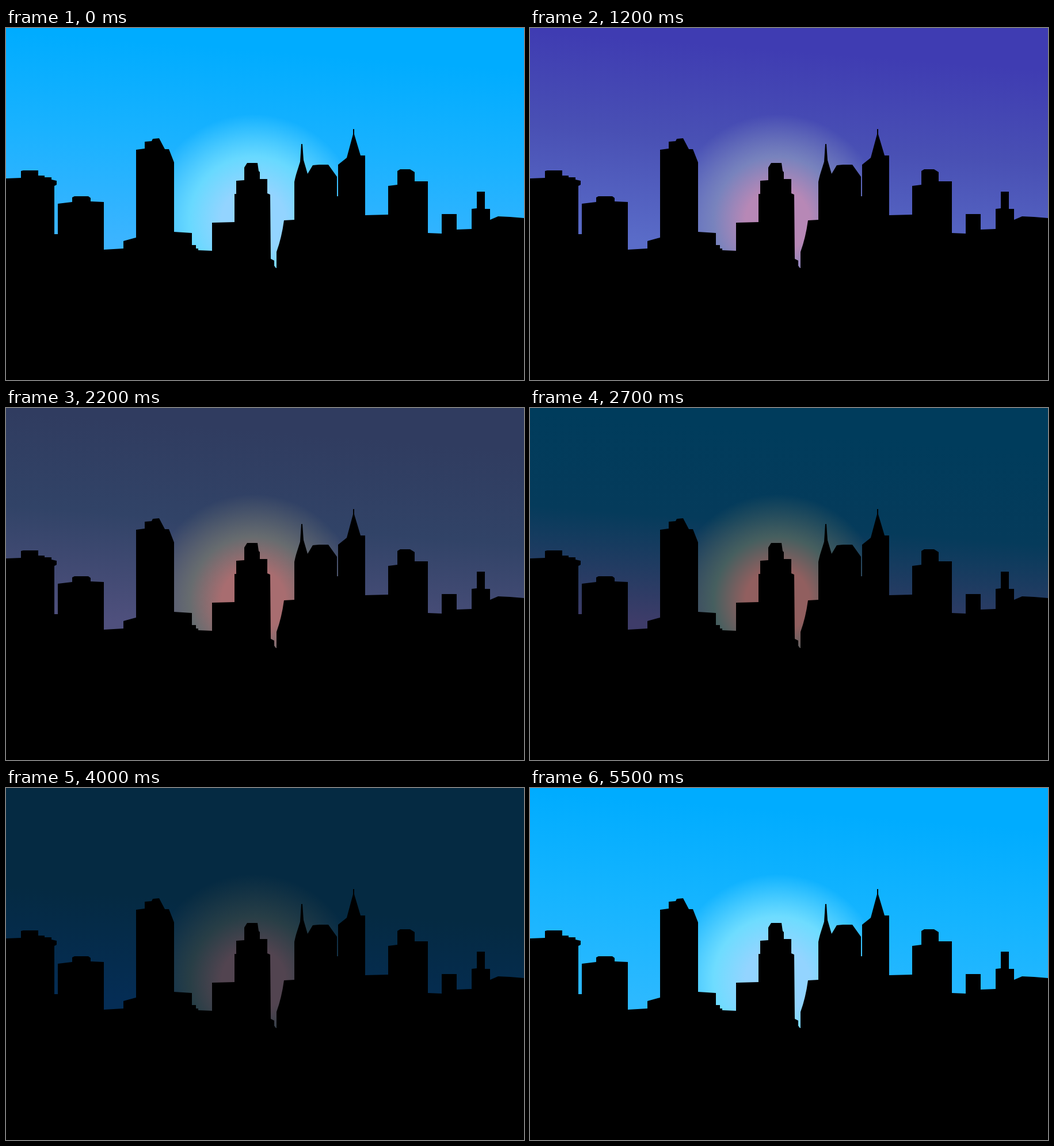
An HTML page for the animation above (5600 ms loop, 900 px wide and 613 px high).

```html
<!DOCTYPE html>
<html lang="en">
<head>
<meta charset="utf-8">
<title>Skyline through a day</title>
<style>
  @property --zenith  { syntax: "<color>"; inherits: true; initial-value: #00acff; }
  @property --sky     { syntax: "<color>"; inherits: true; initial-value: #19b2ff; }
  @property --horizon { syntax: "<color>"; inherits: true; initial-value: #3cb4ff; }
  @property --core    { syntax: "<color>"; inherits: true; initial-value: #93d4ff; }
  @property --halo    { syntax: "<color>"; inherits: true; initial-value: #68d9ff; }

  html, body { margin: 0; width: 100%; height: 100%; overflow: hidden; background: #000; }
  svg { display: block; width: 100%; height: 100%; animation: day 5600ms infinite; }

  .zenith  { stop-color: var(--zenith); }
  .sky     { stop-color: var(--sky); }
  .horizon { stop-color: var(--horizon); }
  .core    { stop-color: var(--core); }
  .halo    { stop-color: var(--halo); }

  /* Every step lasts 100 ms. */
  @keyframes day {
    0% {
      --zenith: #00acff; --sky: #19b2ff; --horizon: #3cb4ff; --core: #93d4ff; --halo: #68d9ff;
      animation-timing-function: steps(7);
    }
    12.5% {
      --zenith: #1e3cff; --sky: #3555f5; --horizon: #5573ff; --core: #b096eb; --halo: #688efa;
      animation-timing-function: steps(10);
    }
    30.3571% {
      --zenith: #5f3c64; --sky: #5d4a72; --horizon: #5f6491; --core: #be7a80; --halo: #87787f;
      animation-timing-function: steps(10);
    }
    48.2143% {
      --zenith: #003c5c; --sky: #053b5b; --horizon: #3e3c69; --core: #915f5f; --halo: #465f5f;
      animation-timing-function: steps(13);
    }
    71.4286% {
      --zenith: #052a42; --sky: #052a42; --horizon: #052d55; --core: #524450; --halo: #283e46;
      animation-timing-function: steps(8);
    }
    85.7143% {
      --zenith: #144ba5; --sky: #1952a8; --horizon: #2364b2; --core: #968caf; --halo: #5582aa;
      animation-timing-function: steps(7);
    }
    98.2143%, 100% {
      --zenith: #00acff; --sky: #14b4ff; --horizon: #2db9ff; --core: #93d4ff; --halo: #6edcff;
      animation-timing-function: steps(1);
    }
  }
</style>
</head>
<body>
<svg viewBox="0 0 900 613" preserveAspectRatio="none">
  <defs>
    <linearGradient id="air" gradientUnits="userSpaceOnUse" x1="450" y1="0" x2="420" y2="390">
      <stop class="zenith" offset=".1"/>
      <stop class="sky" offset=".52"/>
      <stop class="horizon" offset="1"/>
    </linearGradient>
    <radialGradient id="sun" gradientUnits="userSpaceOnUse" cx="430" cy="335" r="185">
      <stop class="core" offset=".3"/>
      <stop class="halo" offset=".6"/>
      <stop class="halo" offset="1" stop-opacity="0"/>
    </radialGradient>
  </defs>

  <rect width="900" height="430" fill="url(#air)"/>
  <circle cx="430" cy="335" r="185" fill="url(#sun)"/>

  <g id="city">
    <path d="M0 613V262L26 261V249L30 248H56V257H67V260H79V264L88 266V273L84 275V359H90V306
      L115 303V295L119 293H143L147 296V302L170 303V386L204 384V613Z"/>
    <path d="M204 613V371L222 366 226 365V212L241 210V198L253 197 255 193 266 192 276 211H283
      L292 234V355L323 357V378H330V384H334V387L358 388V613Z"/>
    <path d="M358 613V339L397 338V289H400V266L414 265V243L419 235H437L439 249 441 251V263H454
      V288L459 290 460 402 466 405V414L469 418H470V613Z"/>
    <path d="M470 613V390Q479 365 483 335L501 334V268Q503 258 505 252L511 233 513 202H515
      L517 230 524 254 533 239 544 238H560L575 259V293H577V238L592 226 603 185V176H605V185
      L616 222H624V326L664 325V613Z"/>
    <path d="M664 613V275L680 273V249L685 246H702L710 251V267H733V357L757 358V324H783V351
      L809 350V315L818 314V285H832V315H841V334L855 328 876 329 900 331V613Z"/>
  </g>
</svg>
</body>
</html>
```
